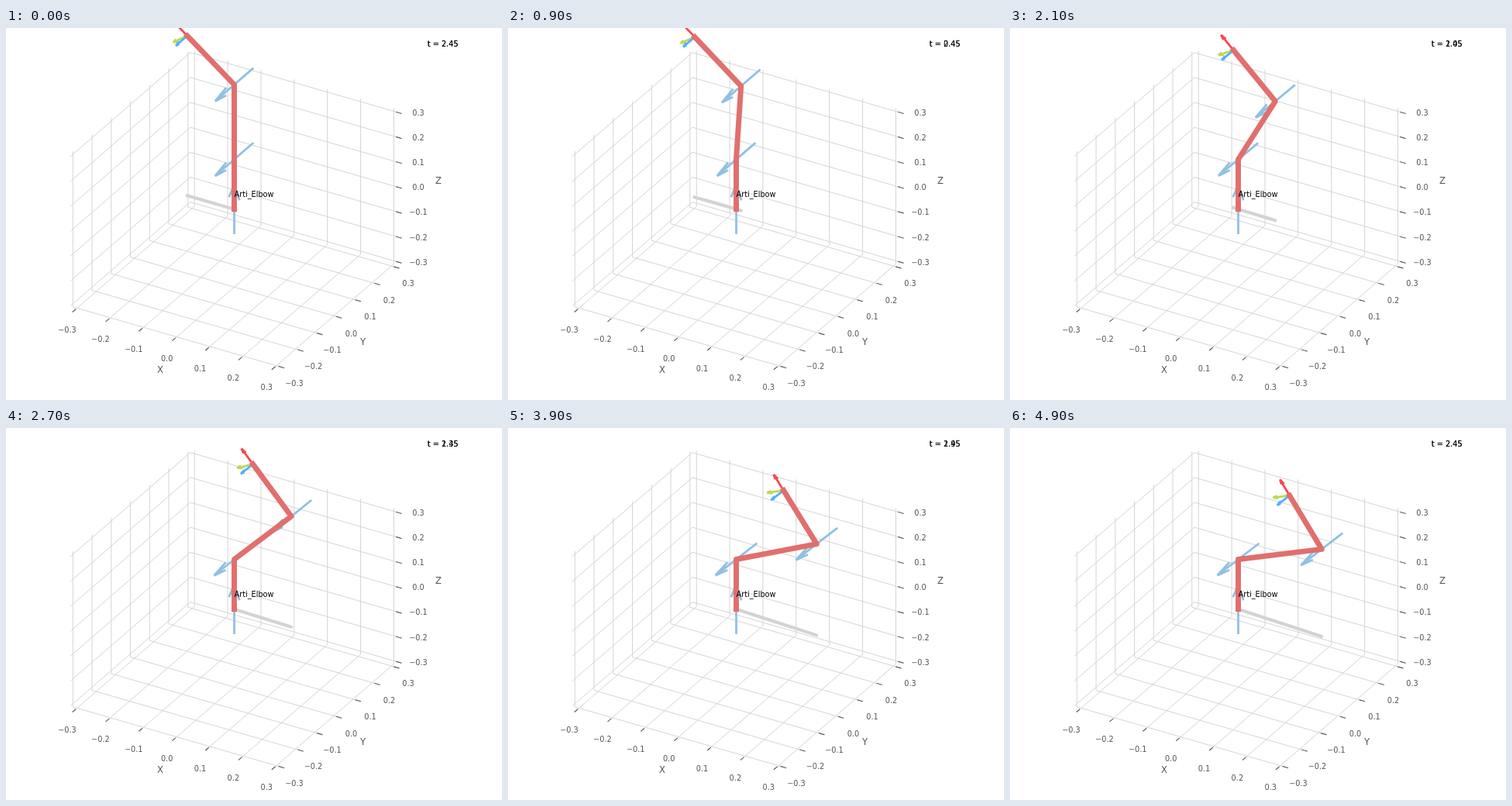
Animation of 640x480 px, one loop 5 s. Source, as an HTML page:

```html
<!DOCTYPE html>
<html lang="en">
<head>
<meta charset="utf-8">
<title>Elbow arm</title>
<style>
  html, body { margin: 0; width: 100%; height: 100%; overflow: hidden; background: #fff; }
  svg { display: block; width: 640px; height: 480px; }
  text { font: 9.72px "DejaVu Sans", sans-serif; fill: #000; }
  .tick { fill: #555; text-anchor: middle; }
  .axis { fill: #555; text-anchor: middle; font-size: 11.67px; }
  path { fill: none; stroke-linejoin: round; }
</style>
</head>
<body>
<svg id="stage" viewBox="0 0 640 480"></svg>
<script>
const svg = document.getElementById('stage');
const RAD = Math.PI / 180;
const STEPS = 50, STEP_MS = 100;
const EDGE = 0.3125;

function add(tag, attrs, text) {
  const el = document.createElementNS('http://www.w3.org/2000/svg', tag);
  for (const k in attrs) el.setAttribute(k, attrs[k]);
  if (text) el.textContent = text;
  svg.appendChild(el);
  return el;
}

const stroke = (color, width, cap = 'butt') =>
  add('path', { stroke: color, 'stroke-width': width, 'stroke-linecap': cap });

// Orthographic view: elevation 30, azimuth -60, z squeezed to 3/4.
function project([x, y, z]) {
  const s = 495, c = Math.cos(30 * RAD);
  return [
    294.5 + s * (c * x + 0.5 * y),
    233.8 + s * (0.25 * x - 0.5 * c * y - 0.75 * c * z)
  ];
}

const line = (...pts) =>
  'M' + pts.map(p => project(p).map(v => v.toFixed(2)).join(' ')).join('L');
const along = (p, d, k) => p.map((v, i) => v + d[i] * k);

// Arrow with two barbs, 15 degrees either side, in the vertical plane of d.
function arrow(from, d, len) {
  const tip = along(from, d, len);
  const h = Math.hypot(d[0], d[1]);
  const [ux, uy] = h > 1e-9 ? [d[1] / h, -d[0] / h] : [0, 1];
  const side = [uy * d[2], -ux * d[2], ux * d[1] - uy * d[0]];
  const barb = sign => {
    const v = d.map((c, i) => c * Math.cos(15 * RAD) + sign * side[i] * Math.sin(15 * RAD));
    return line(along(tip, v, -0.3 * len), tip);
  };
  return line(from, tip) + barb(1) + barb(-1);
}
const centred = (p, d) => arrow(along(p, d, -0.1), d, 0.2);

function drawBox() {
  let grid = '', ticks = '';
  for (let i = 0; i < 7; i++) {
    const v = (i - 3) / 10;
    grid += line([v, -EDGE, -EDGE], [v, EDGE, -EDGE], [v, EDGE, EDGE])
          + line([EDGE, v, -EDGE], [-EDGE, v, -EDGE], [-EDGE, v, EDGE])
          + line([-EDGE, -EDGE, v], [-EDGE, EDGE, v], [EDGE, EDGE, v]);
    const inner = EDGE - 0.005, outer = EDGE + 0.01;
    ticks += line([v, -inner, -EDGE], [v, -outer, -EDGE])
           + line([inner, v, -EDGE], [outer, v, -EDGE])
           + line([inner, EDGE, v], [outer, EDGE, v]);
    const label = v.toFixed(1).replace('-', '\u2212');
    const put = (x, y) => add('text', { class: 'tick', x, y }, label);
    put(79 + 42.87 * i, 393 + 12.38 * i);
    put(372 + 24.5 * i, 461.7 - 21.4 * i);
    put(532, 305.7 - 32.15 * i);
  }
  stroke('#d4d4d4', 1).setAttribute('d', grid);
  stroke('#555', 1.1, 'square').setAttribute('d', ticks);
  add('text', { class: 'axis', x: 199, y: 445 }, 'X');
  add('text', { class: 'axis', x: 460.5, y: 409 }, 'Y');
  add('text', { class: 'axis', x: 558, y: 201 }, 'Z');
}

drawBox();
const shadow = stroke('#d3d3d3', 4.17, 'square');
const joints = stroke('#8fc1e2', 2.78);
const toolX = stroke('#f84752', 2.78);
const toolY = stroke('#bada55', 2.78);
const toolZ = stroke('#54aeff', 2.78);
const arm = stroke('#e16f6d', 6.94, 'square');
add('text', { x: 294.6, y: 218 }, 'Arti_Elbow');
add('text', { x: 543.8, y: 24 }, 't = 2.45');
const clock = add('text', { x: 543.8, y: 24 });

function render(ms) {
  const n = Math.floor(ms / STEP_MS) % STEPS;
  const s = n / (STEPS - 1);
  const p = s * s * s * (10 - 15 * s + 6 * s * s);

  const turn = -3.1 * RAD * p;
  const upper = 60 * RAD * p;
  const lower = upper - (45 + 45 * p) * RAD;

  // Unit vector in the arm's plane, tilted from the vertical.
  const tilt = a => [Math.sin(a) * Math.cos(turn), Math.sin(a) * Math.sin(turn), Math.cos(a)];
  const hinge = [Math.sin(turn), -Math.cos(turn), 0];

  const base = [0, 0, 0];
  const shoulder = [0, 0, 0.2];
  const elbow = along(shoulder, tilt(upper), 0.3);
  const wrist = along(elbow, tilt(lower), 0.2);
  const chain = [base, shoulder, elbow, wrist];

  arm.setAttribute('d', line(...chain));
  shadow.setAttribute('d', line(...chain.map(([x, y]) => [x, y, 0])));
  joints.setAttribute('d',
    centred(base, [0, 0, 1]) + centred(shoulder, hinge) + centred(elbow, hinge));
  toolX.setAttribute('d', arrow(wrist, tilt(lower), 0.06));
  toolY.setAttribute('d', arrow(wrist, tilt(lower - 90 * RAD), 0.06));
  toolZ.setAttribute('d', arrow(wrist, hinge, 0.06));
  clock.textContent = 't = ' + (n ? n * 0.05 : 2.45).toFixed(2);
}

const start = performance.now();
function loop() {
  render(performance.now() - start);
  requestAnimationFrame(loop);
}
loop();
</script>
</body>
</html>
```
